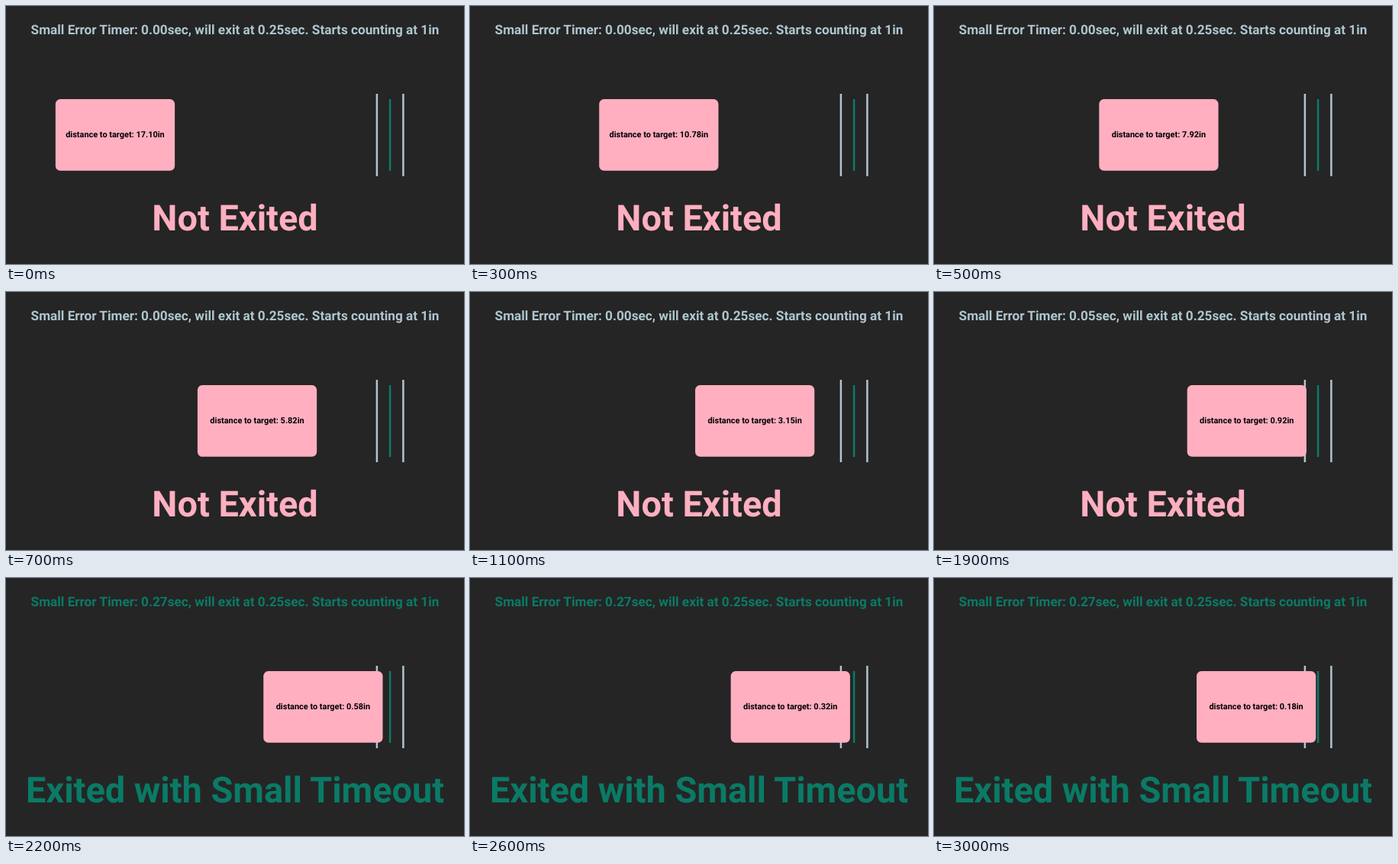
An HTML page for the animation above (3100 ms loop, 600 px wide and 338 px high).

```html
<!DOCTYPE html>
<html lang="en">
<head>
<meta charset="utf-8">
<title>Small error timer</title>
<style>
  html, body { margin: 0; width: 100%; height: 100%; overflow: hidden; background: #252525; }
  svg { display: block; width: 100vw; height: 100vh; }
  text { font-family: Roboto, sans-serif; font-weight: 700; text-anchor: middle; text-rendering: geometricPrecision; }
</style>
</head>
<body>
<svg viewBox="0 0 600 338">
  <rect width="600" height="338" fill="#252525"/>
  <text id="title" x="300" y="36.9" font-size="17.19"></text>
  <g stroke-width="2.5">
    <path d="M485.9 115V223M520.4 115V223" stroke="#aec6cf"/>
    <path d="M503.1 122V216" stroke="#0a7a66"/>
  </g>
  <g id="box">
    <rect y="122.1" width="156.25" height="93.75" rx="6.25" fill="#ffafc0"/>
    <text id="label" x="78.1" y="172.4" font-size="10.94"></text>
  </g>
  <text id="status" x="300" y="294" font-size="46.88"></text>
</svg>
<script>
const LOOP = 3100, STEP = 100;
const PX_PER_INCH = 16.49, TARGET_LEFT = 346.9;
const COUNT_START = 1.85, TICK = 1 / 60, EXIT_TIME = COUNT_START + 16 * TICK;
const BLUE = '#aec6cf', PINK = '#ffafc0', GREEN = '#0a7a66';

const [title, box, label, status] =
  ['title', 'box', 'label', 'status'].map(id => document.getElementById(id));

// Proportional controller: the error decays exponentially.
const distance = t => 0.008 + 17.096 * Math.exp(-1.541 * t);

function setText(el, text, fill) {
  if (el.textContent !== text) el.textContent = text;
  el.setAttribute('fill', fill);
}

function draw(ms) {
  const t = Math.floor((ms % LOOP) / STEP) * STEP / 1000;
  const d = distance(t);
  const exited = t >= EXIT_TIME;
  const timer = Math.max(0, Math.min(t, EXIT_TIME) - COUNT_START);

  box.setAttribute('transform', `translate(${TARGET_LEFT - d * PX_PER_INCH} 0)`);
  setText(label, `distance to target: ${d.toFixed(2)}in`, '#000');
  setText(title,
    `Small Error Timer: ${timer.toFixed(2)}sec, will exit at 0.25sec. Starts counting at 1in`,
    exited ? GREEN : BLUE);
  setText(status, exited ? 'Exited with Small Timeout' : 'Not Exited', exited ? GREEN : PINK);
}

function loop() {
  draw(performance.now());
  requestAnimationFrame(loop);
}
loop();
</script>
</body>
</html>
```
